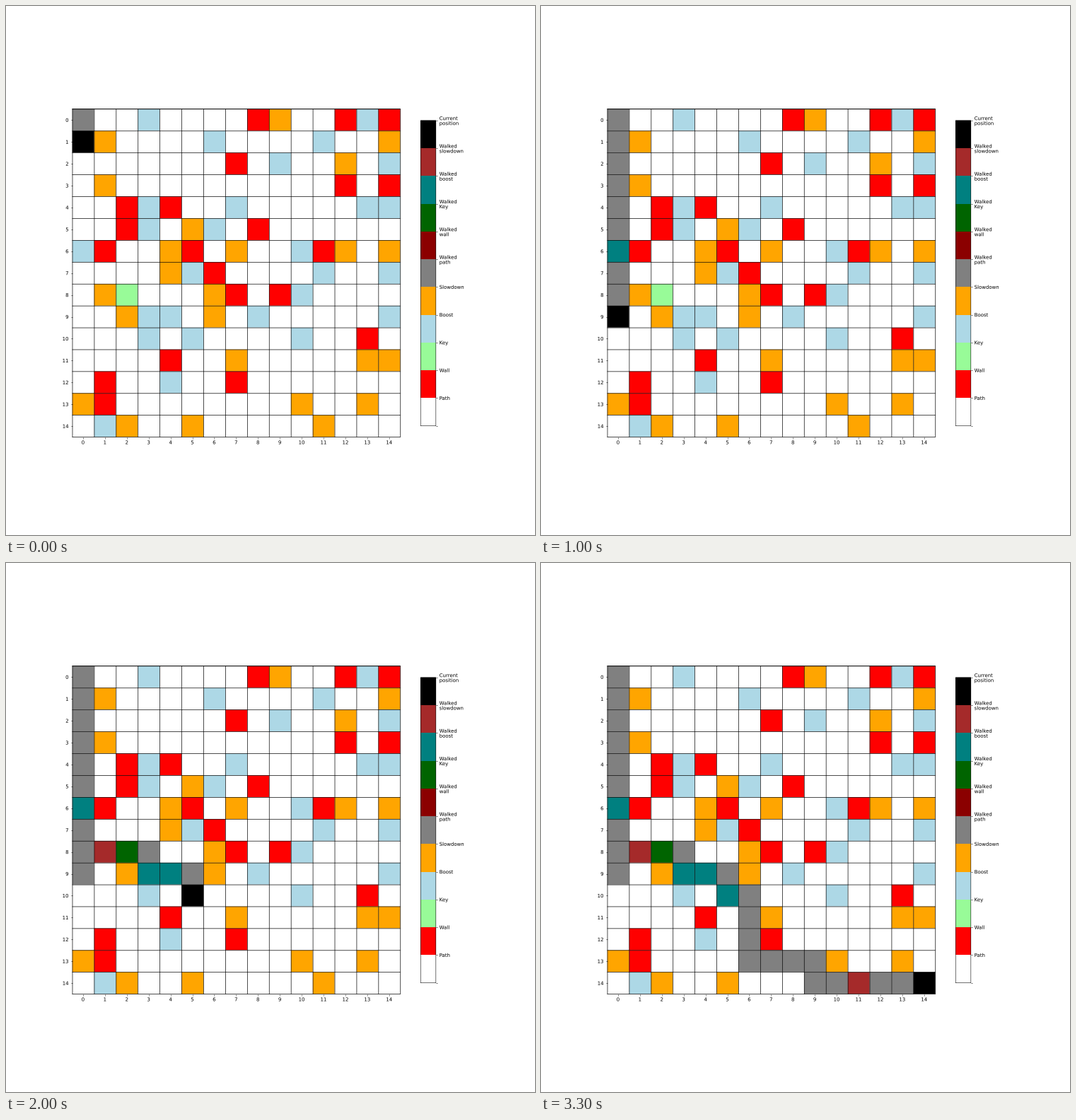
A matplotlib script for the animation above (3.4 s loop, 748 by 748 pixels).

```python
import numpy as np
import matplotlib.pyplot as plt
from matplotlib.animation import FuncAnimation
from matplotlib.colors import ListedColormap
from matplotlib.patheffects import Normal

SIZE, DPI = 748, 50
STEP_MS = 100

# . path, W wall, K key, B boost, S slowdown
KINDS = ".WKBS"
MAZE = """
...B....WS..WBW
.S....B....B..S
.......W.B..S.B
.S..........W.W
..WBW..B.....BB
..WB.SB.W......
BW..SW.S..BWS.S
....SBW....B..B
.SK...SW.WB....
..SBB.S.B.....B
...B.B....B..W.
....W..S.....SS
.W..B..W.......
SW........S..S.
.BS..S.....S...
""".split()
MOVES = "D" * 9 + "UDUDU" + "RRRDRRDRDDDRRRD" + "R" * 5
DELTA = {"D": (1, 0), "U": (-1, 0), "R": (0, 1)}

COLORS = ["white", "red", "palegreen", "lightblue", "orange",
          "gray", "darkred", "darkgreen", "teal", "brown", "black"]
LABELS = ["", "Path", "Wall", "Key", "Boost", "Slowdown",
          "Walked\npath", "Walked\nwall", "Walked\nKey",
          "Walked\nboost", "Walked\nslowdown", "Current\nposition"]
WALKED = len(KINDS)
CURRENT = len(COLORS) - 1

cells = np.array([[KINDS.index(c) for c in row] for row in MAZE])
n = len(cells)
route = np.cumsum([(0, 0)] + [DELTA[m] for m in MOVES], axis=0)


def state(step):
    grid = cells.copy()
    rows, cols = route[:step + 1].T
    grid[rows, cols] = cells[rows, cols] + WALKED
    grid[tuple(route[step + 1])] = CURRENT
    return grid


plt.rcParams["font.family"] = "DejaVu Sans"
fig, ax = plt.subplots(figsize=(SIZE / DPI, SIZE / DPI), dpi=DPI)
ax.set(xlim=(-0.5, n - 0.5), ylim=(n - 0.5, -0.5), aspect="equal",
       xticks=range(n), yticks=range(n))
ax.spines[:].set_visible(False)

# Unsnapped edges keep all cells the same size; HAIR is half a pixel in cells.
HAIR = 1 / 62
edges = np.arange(n + 1) - 0.5
mesh = ax.pcolormesh(edges + HAIR / 2, edges - HAIR / 2, state(0),
                     cmap=ListedColormap(COLORS), vmin=0, vmax=len(COLORS),
                     antialiased=True, snap=False, clip_on=False)
line = dict(colors="black", linewidth=1, snap=False, clip_on=False)
ax.vlines(edges + HAIR, -0.5, n - 0.5, **line)
ax.hlines([-0.5 - HAIR, *edges], -0.5, n - 0.5 + HAIR, **line)
ax.set(xlim=(-0.5, n - 0.5), ylim=(n - 0.5, -0.5))

bar = fig.colorbar(mesh, ax=ax, shrink=0.75)
bar.set_ticks(range(len(LABELS)), labels=LABELS)
bar.outline.set_snap(False)

# Drawn as outlines, the labels sit at fractional pixel positions.
for axis in (ax.xaxis, ax.yaxis, bar.ax.yaxis):
    plt.setp(axis.get_ticklabels(), path_effects=[Normal()])


def update(step):
    mesh.set_array(state(step))
    return (mesh,)


anim = FuncAnimation(fig, update, frames=len(MOVES), interval=STEP_MS,
                     repeat=True, repeat_delay=0)
plt.show()
```
